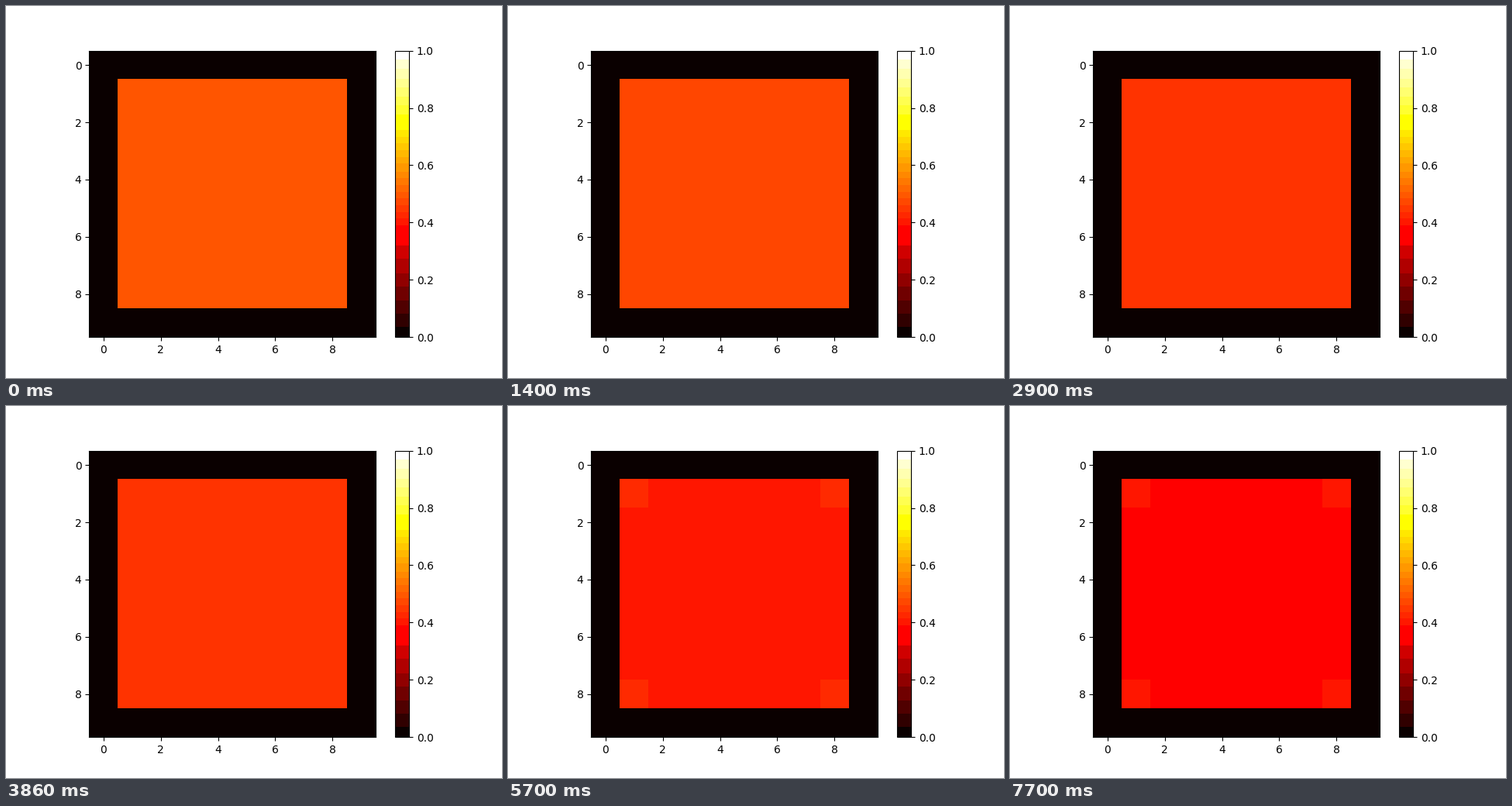
Recreate the animation shown at these times as a matplotlib script. Size 640 px wide and 480 px high, loop 8000 ms.

```python
import numpy as np
import matplotlib.pyplot as plt
from matplotlib.animation import FuncAnimation
from matplotlib.cm import ScalarMappable
from matplotlib.colors import ListedColormap, Normalize

STEP_MS = 100
LOOP_MS = 8000
SIZE = 10
COLD = (10, 0, 0)

# Start of each cooling stage and the green level of the plate there
STARTS = [0, 1400, 2900, 4500, 5700, 6500, 7700]
CORE = [85, 70, 51, 32, 22, 10, 0]
EDGE = [85, 70, 51, 42, 22, 22, 0]
CORNER = [85, 70, 51, 42, 42, 22, 22]


def banded(channel, width):
    """Flatten a 0..255 channel into bands, keeping both ends pure."""
    band = np.floor(channel / width)
    mid = band * width + width / 2
    mid[band == 0] = 0
    mid[channel >= 256 - width] = 255
    return mid


def banded_hot():
    rgb = plt.get_cmap("hot")(np.linspace(0, 1, 256))[:, :3] * 255
    r, g, b = rgb.T
    bands = np.stack([banded(r, 32), banded(g, 16), banded(b, 32)], axis=1)
    bands[:, 0] = np.maximum(bands[:, 0], COLD[0])
    return ListedColormap(bands / 255)


def plate(t):
    stage = np.searchsorted(STARTS, t, side="right") - 1
    grid = np.empty((SIZE, SIZE, 3), dtype=np.uint8)
    grid[:] = COLD
    inner = grid[1:-1, 1:-1]
    inner[:] = (255, EDGE[stage], 0)
    inner[1:-1, 1:-1, 1] = CORE[stage]
    inner[::SIZE - 3, ::SIZE - 3, 1] = CORNER[stage]
    return grid


plt.rcParams["font.family"] = "DejaVu Sans"
fig, ax = plt.subplots(figsize=(6.4, 4.8), dpi=100)
image = ax.imshow(plate(0), interpolation="nearest")
fig.colorbar(ScalarMappable(Normalize(0, 1), banded_hot()), ax=ax)


def update(i):
    image.set_data(plate(i * STEP_MS))
    return (image,)


anim = FuncAnimation(fig, update, frames=LOOP_MS // STEP_MS,
                     interval=STEP_MS, repeat=True, repeat_delay=0)
plt.show()
```
